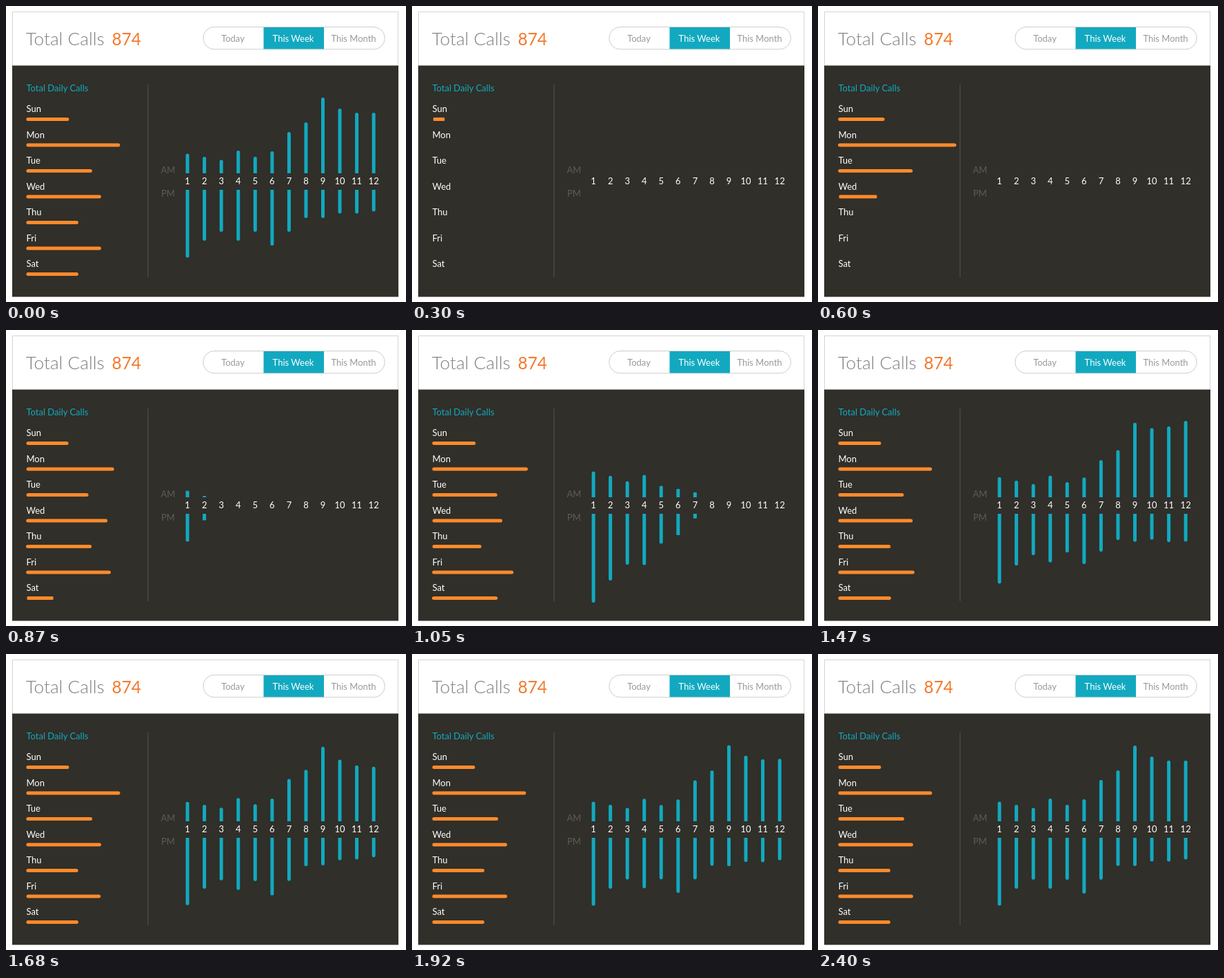
An HTML page for the animation above (3.9 s loop, 580x430 px).

```html
<!DOCTYPE html>
<html lang="en">
<head>
<meta charset="utf-8">
<title>Total Calls</title>
<style>
  html, body { margin: 0; width: 100%; height: 100%; overflow: hidden; background: #fff; }
  svg { display: block; width: 580px; height: 430px; }
  text { font: 13px Lato, "Open Sans", sans-serif; fill: #fff; }
  .title { font-size: 26.2px; font-weight: 300; fill: #7d7d7d; }
  .total { font-size: 24.4px; fill: #f37a2c; }
  .mid { text-anchor: middle; }
  .tab { fill: #999; }
  .dim { fill: #5d5c56; }
  .teal { fill: #12a9c0; }
  .orange { fill: #ff8a2c; }
</style>
</head>
<body>
<svg id="stage" viewBox="0 0 580 430">
  <rect x="9.5" y="8.5" width="559" height="413" fill="#fff" stroke="#d4d4d4"/>
  <rect x="9" y="86.5" width="560" height="336" fill="#302f29"/>
  <text class="title" x="28.7" y="57">Total Calls</text>
  <text class="total" x="153.5" y="57">874</text>
  <rect x="285.8" y="30.5" width="263.5" height="32.4" rx="16.2" fill="#fff" stroke="#ccc"/>
  <rect class="teal" x="373.5" y="31" width="87.5" height="31.5"/>
  <text class="mid tab" x="329" y="52">Today</text>
  <text class="mid" x="416.5" y="52" font-weight="500">This Week</text>
  <text class="mid tab" x="504" y="52">This Month</text>
  <text class="teal" x="29.5" y="123.7">Total Daily Calls</text>
  <path d="M206 114V394" stroke="#55544e"/>
  <text class="mid dim" x="235" y="243.2">AM</text>
  <text class="mid dim" x="235" y="276.5">PM</text>
</svg>
<script>
const LOOP = 3900, STEP = 30;
const days = { Sun: 62, Mon: 136, Tue: 95.5, Wed: 108.5, Thu: 75.5, Fri: 108.5, Sat: 75.5 };
const am = [28.5, 24, 19.5, 33, 24, 32, 60, 74, 110, 94, 88, 88];
const pm = [98.5, 74, 61, 74, 61, 81, 61, 41, 41, 34.5, 34.5, 31.5];
const stage = document.getElementById("stage");
const bars = [];

function add(tag, attrs, content = "") {
  const el = document.createElementNS("http://www.w3.org/2000/svg", tag);
  for (const name in attrs) el.setAttribute(name, attrs[name]);
  el.textContent = content;
  stage.append(el);
  return el;
}

// Underdamped spring from 0 to 1, starting at rest
function spring(t, w, k) {
  return t <= 0 ? 0 : 1 - Math.exp(-k * t) * (Math.cos(w * t) + k / w * Math.sin(w * t));
}

Object.entries(days).forEach(([name, width], i) => {
  const y = 164.6 + 37.5 * i;
  add("text", { x: 29.5, y: y - 10.5 }, name);
  // Scales about a point just inside the left cap
  const el = add("rect", { class: "orange", x: -1.9, y: -2.5, width, height: 5, rx: 2.5 });
  bars.push(t => {
    const s = spring(t - 239 - 90 * i, .0126, .0052);
    el.setAttribute("transform", `translate(31.3 ${y}) scale(${s} 1)`);
  });
});

function column(x, y, dir, height, start) {
  const d = `M-2.5 0V${height - 2.5}a2.5 2.5 0 0 0 5 0V0z`;
  const el = add("path", { class: "teal", d });
  bars.push(t => {
    const s = spring(t - start, .0133, .0048);
    el.setAttribute("transform", `translate(${x} ${y}) scale(1 ${dir * s})`);
  });
}

for (let i = 0; i < 12; i++) {
  const x = 263.1 + 24.55 * i;
  add("text", { class: "mid", x, y: 259.4 }, i + 1);
  column(x, 243, -1, am[i], 804 + 34.8 * i);
  column(x, 267, 1, pm[i], 795 + 36.6 * i);
}

function draw(now) {
  const t = Math.floor(now % LOOP / STEP) * STEP;
  // The full chart stays for one step before it is cleared
  const pose = t < STEP ? LOOP : Math.min(t, 2400);
  bars.forEach(bar => bar(pose));
}

let begin;
function tick(now) {
  begin ??= now;
  draw(now - begin);
  requestAnimationFrame(tick);
}
draw(0);
requestAnimationFrame(tick);
</script>
</body>
</html>
```
